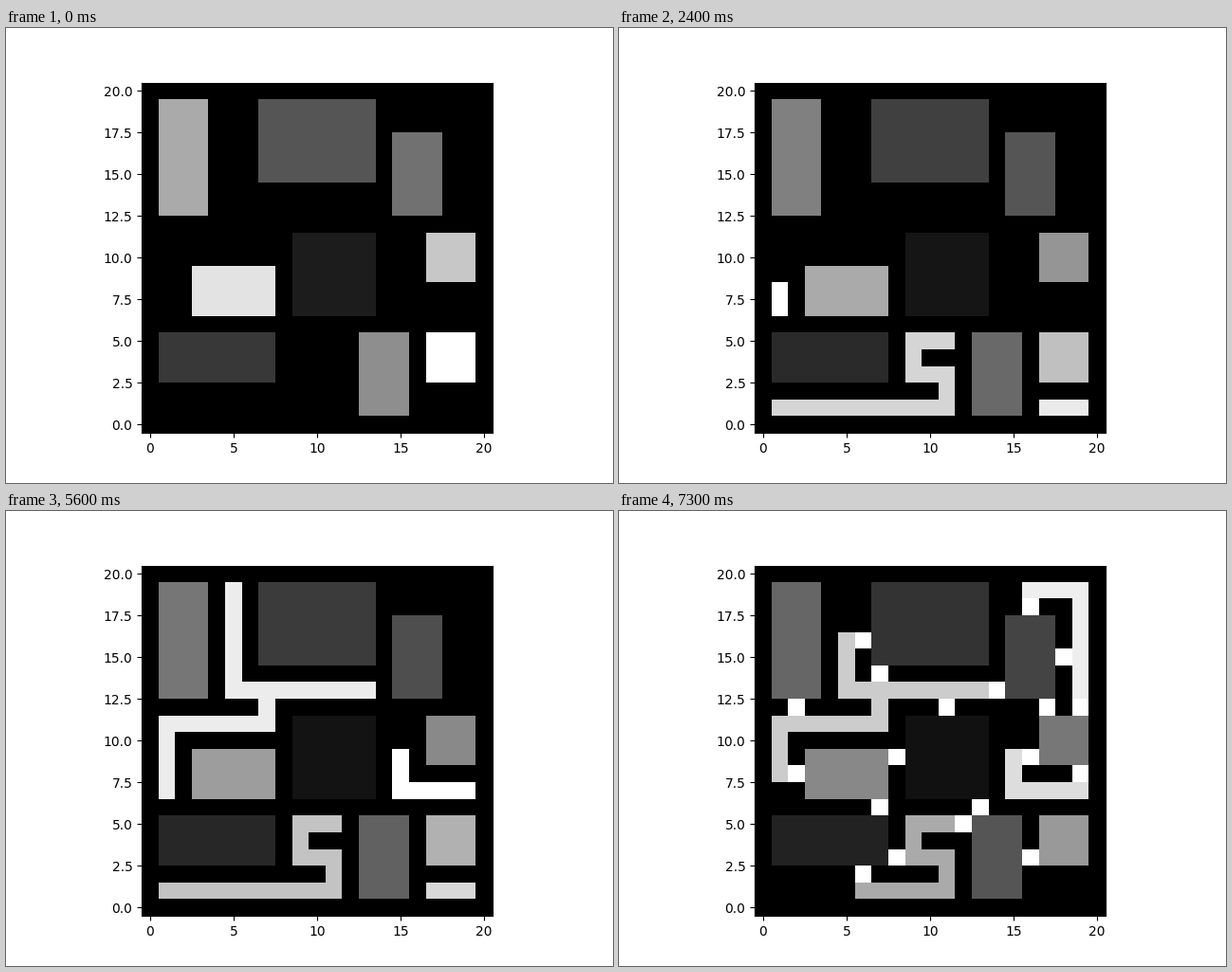
These frames come from a looping animation (640 by 480 pixels, 8400 ms). A matplotlib script:

```python
import numpy as np
import matplotlib.pyplot as plt
from matplotlib.animation import FuncAnimation

SIZE = 21
FRAMES, INTERVAL = 84, 100
STEPS = [(-1, 0), (1, 0), (0, 1), (0, -1)]  # preferred order: left, right, up, down

# x, y, width, height; region numbers follow this order
ROOMS = [(9, 7, 5, 5), (1, 3, 7, 3), (7, 15, 7, 5), (15, 13, 3, 5),
         (13, 1, 3, 5), (1, 13, 3, 7), (17, 9, 3, 3), (3, 7, 5, 3),
         (17, 3, 3, 3)]

# row -> columns of the doors that join neighbouring regions
DOORS = {2: [6], 3: [8, 16], 5: [12], 6: [7, 13], 8: [2, 19], 9: [8, 16],
         12: [2, 11, 17, 19], 13: [14], 14: [7], 15: [18], 16: [6], 18: [16]}


def grow(grid, x, y, region):
    """Carve a maze depth first from (x, y), yielding after each cell."""
    grid[y, x] = region
    yield
    for dx, dy in STEPS:
        nx, ny = x + 2 * dx, y + 2 * dy
        if 0 < nx < SIZE and 0 < ny < SIZE and not grid[ny, nx]:
            grid[y + dy, x + dx] = region
            yield
            yield from grow(grid, nx, ny, region)


def prune(grid):
    """Fill dead ends in one sweep; return whether anything changed."""
    changed = False
    for y in range(1, SIZE - 1):
        for x in range(1, SIZE - 1):
            exits = sum(grid[y + dy, x + dx] > 0 for dx, dy in STEPS)
            if grid[y, x] and exits <= 1:
                grid[y, x] = 0
                changed = True
    return changed


def build():
    """Yield the successive states of the dungeon."""
    grid = np.zeros((SIZE, SIZE), int)
    for region, (x, y, w, h) in enumerate(ROOMS, 1):
        grid[y:y + h, x:x + w] = region
    yield grid.copy()

    for y in range(1, SIZE, 2):
        for x in range(1, SIZE, 2):
            if not grid[y, x]:
                for _ in grow(grid, x, y, grid.max() + 1):
                    yield grid.copy()
    yield grid.copy()

    door = grid.max() + 1
    for y, columns in DOORS.items():
        grid[y, columns] = door
    while prune(grid):
        yield grid.copy()


states = list(build())
fig, ax = plt.subplots(figsize=(6.4, 4.8), dpi=100)
image = ax.imshow(states[0], cmap="gray", origin="lower", interpolation="nearest")


def update(i):
    grid = states[min(i, len(states) - 1)]
    image.set_data(grid)
    image.set_clim(0, grid.max())
    return [image]


anim = FuncAnimation(fig, update, frames=FRAMES, interval=INTERVAL,
                     repeat=True, repeat_delay=0, blit=False)
plt.show()
```
